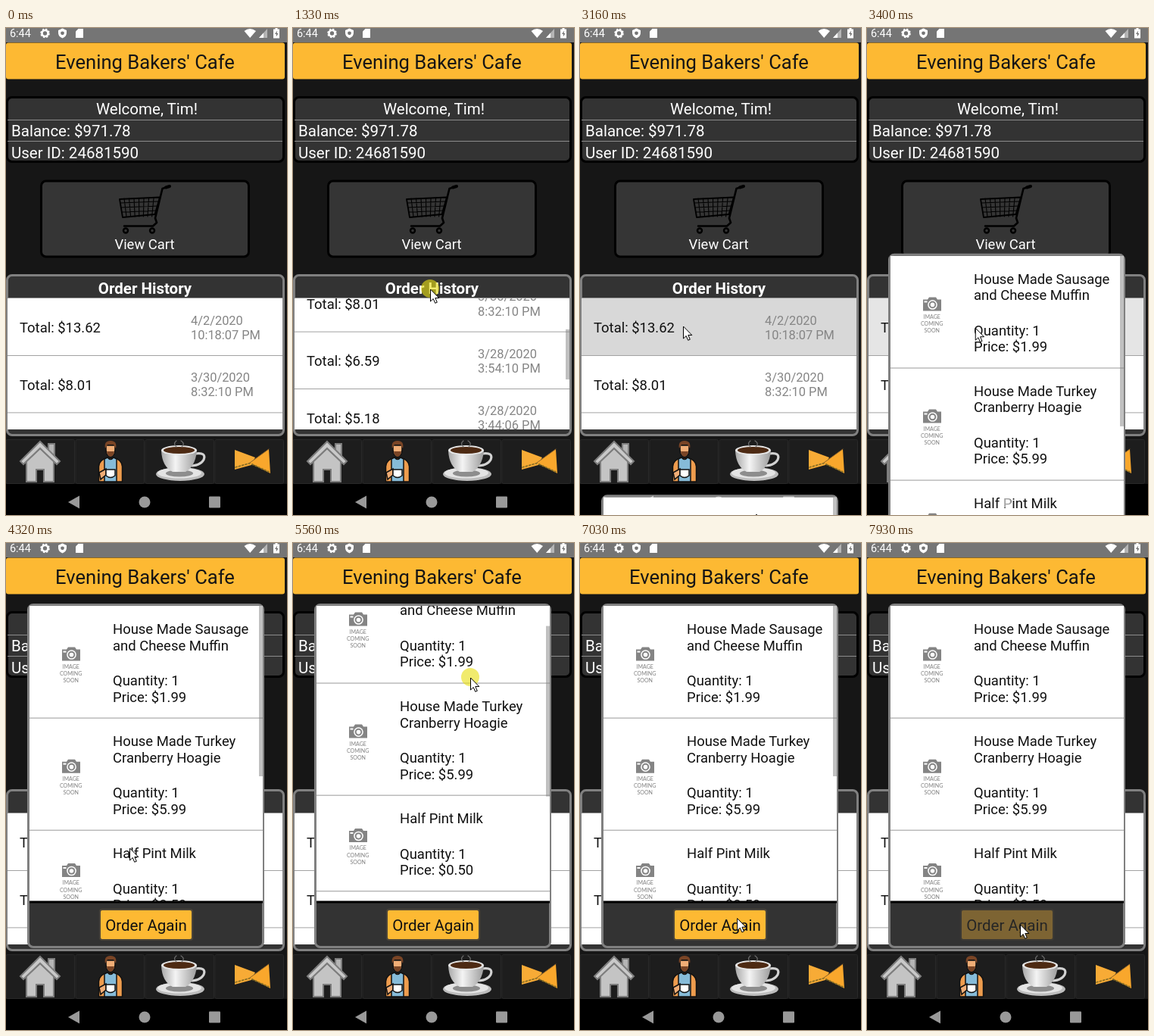
An HTML page that plays this animation: 371 by 643 pixels, repeating every 8000 ms.

```html
<!DOCTYPE html>
<html lang="en">
<head>
<meta charset="utf-8">
<title>Cafe order history</title>
<style>
html, body { margin: 0; width: 100%; height: 100%; overflow: hidden; background: #161616; }
svg { display: block; width: 371px; height: 643px; font-family: Roboto, sans-serif; }
.soon { font-family: Lato, sans-serif; }
</style>
</head>
<body>
<svg id="stage" viewBox="0 0 371 643" xmlns="http://www.w3.org/2000/svg"></svg>
<script>
const LOOP = 8000;
const LIST = { top: 357, view: 173, row: 75.4 };
const SHEET = { top: 83, view: 390, line: 21.5, rise: 563 };

const orders = [
  ['$13.62', '4/2/2020', '10:18:07 PM'],
  ['$8.01', '3/30/2020', '8:32:10 PM'],
  ['$6.59', '3/28/2020', '3:54:10 PM'],
  ['$5.18', '3/28/2020', '3:44:06 PM'],
  ['$7.25', '3/27/2020', '9:15:42 PM'],
  ['$4.49', '3/26/2020', '6:21:30 PM']
];
const items = [
  ['$1.99', 'House Made Sausage', 'and Cheese Muffin'],
  ['$5.99', 'House Made Turkey', 'Cranberry Hoagie'],
  ['$0.50', 'Half Pint Milk'],
  ['$1.99', 'Bottled Soda'],
  ['$1.49', 'Bottled Water']
];
const itemHeight = ([, ...name]) => 105.1 + name.length * SHEET.line;
LIST.length = orders.length * LIST.row;
SHEET.length = items.reduce((sum, item) => sum + itemHeight(item), 0);
for (const box of [LIST, SHEET]) {
  box.max = box.length - box.view;
  box.thumb = box.view * box.view / box.length;
}

// Markup helpers
const mid = 'text-anchor="middle"';
const text = (x, y, s, size, fill = '#fff', more = '') =>
  `<text x="${x}" y="${y}" font-size="${size}" fill="${fill}" ${more}>${s}</text>`;
const rect = (x, y, w, h, fill, more = '') =>
  `<rect x="${x}" y="${y}" width="${w}" height="${h}" fill="${fill}" ${more}/>`;
const path = (d, fill, more = '') => `<path d="${d}" fill="${fill}" ${more}/>`;
const line = (d, color, width = 1, more = '') =>
  path(d, 'none', `stroke="${color}" stroke-width="${width}" stroke-linecap="round" stroke-linejoin="round" ${more}`);
const dot = (x, y, r, fill, more = '') => `<circle cx="${x}" cy="${y}" r="${r}" fill="${fill}" ${more}/>`;
const oval = (x, y, rx, ry, fill) => `<ellipse cx="${x}" cy="${y}" rx="${rx}" ry="${ry}" fill="${fill}"/>`;
const panel = (x, y, w, h, fill, edge) =>
  rect(x + 1.5, y + 1.5, w - 3, h - 3, fill, `rx="6.500" stroke="${edge}" stroke-width="3"`);
const repeat = (n, make) => Array.from({ length: n }, (_, i) => make(i)).join('');

function statusBar() {
  return rect(0, 0, 371, 19, '#757575') +
    text(5, 12, '6:44', 14.4) +
    dot(51.5, 7, 4, 'none', 'stroke="#fff" stroke-width="2.6"') +
    dot(51.5, 7, 5.5, 'none', 'stroke="#fff" stroke-width="1.6" stroke-dasharray="2.4 1.92"') +
    path('M74.500 0.500L80 3V7Q79.500 11.500 74.500 13.500Q69.500 11.500 69 7V3Z', '#fff') +
    dot(74.5, 6.8, 2.4, '#757575') +
    path('M95.500 1H102V13H92V4.500Z', '#fff') +
    path('M314.500 4Q322 -2 330 4L322.200 13Z', '#fff') +
    path('M334 13L345 1V13Z', '#b4b4b4') + path('M334 13L340 6.500V13Z', '#fff') +
    path('M355.500 0H358.500V1.500H361V13.500H353V1.500H355.500Z', '#fff') +
    path('M358 3.500L355 8H356.800V11.500L359.500 7H357.600Z', '#757575');
}

function cart() {
  const bars = repeat(7, i => `M${156 + i * 6.5} 225L${159 + i * 5.6} 249`);
  const rows = repeat(3, i => `M${151 + i} ${231 + i * 6}L${202 - i * 1.5} ${229 + i * 6}`);
  return line('M216 209L206.500 212L197 251L199 257L194 261.500H156', '#000', 2.6) +
    line('M150 226L203 223.500L196.500 246L154 250Z', '#000', 1.8) +
    line(bars + rows, '#000', 1.1) +
    line('M211 210.500L216 209', '#000', 4) +
    [158, 193].map(x => dot(x, 267.5, 3, '#353535', 'stroke="#000" stroke-width="2.4"')).join('');
}

function home() {
  const edge = 'stroke="#7d7d7d" stroke-width="2"';
  return path('M56 549H64V566L56 558Z', '#b5b5b5', edge) +
    path('M27 572V599H40V583H50V599H63V572L45 555Z', '#c4c4c4', edge) +
    path('M45 546L71 572L67 576L45 555L23 576L19 572Z', '#c9c9c9', edge);
}

function barista() {
  const edge = 'stroke="#111" stroke-width="1.500"';
  return path('M122.500 599V579Q123 570 133 568H143Q153 570 153.500 579V599Z', '#ee9c4e', edge) +
    path('M130 599V569L134 567Q138 572 142 567L146 569V599Z', '#86bbd8', edge) +
    path('M132 551H144V557Q143.500 566 138 566Q132.500 566 132 557Z', '#f0ad76', edge) +
    path('M131 555Q129 545 138 545Q147 545 145 555L142 550H134Z', '#7a4526') +
    path('M133 559H143Q142 566 138 566Q134 566 133 559Z', '#7a4526') +
    path('M123 587L132 582V590L125 596Z', '#f0ad76', edge) +
    path('M132 583H144V591Q138 596 132 591Z', '#fff', edge);
}

function cup() {
  return oval(230, 589, 32, 9, '#bdbdbd') + oval(229, 587.5, 29, 7, '#e4e4e4') + oval(229, 588, 18, 4.5, '#8d8d8d') +
    line('M250 562Q265 560 261 570Q257 577 246 578', '#d2d2d2', 3.2) +
    path('M205 558Q206 579 220 586H237Q250 579 252 558Z', 'url(#china)') +
    oval(228.5, 557.5, 23.5, 6.5, '#e6e6e6') + oval(228.5, 557.5, 20.5, 4.6, '#4d2a13') +
    line('M225 553Q220 549 225 545M232 553Q237 549 231 545', '#6f6f6f', 1.2);
}

function sandwich() {
  const filling = d => line(d, '#8a6f25', 1.8, 'stroke-dasharray="2 2.500"');
  return path('M302 557L329 567L324 577L302 583Z', '#f7ab36') + filling('M303 580L324 574') +
    path('M322 574L347 556L349 588Z', '#f9a72c') + filling('M325 576L347 586') +
    line('M322 574L347 556', '#93682b', 1);
}

function tabs() {
  const cells = repeat(4, i => rect(i * 92, 543.5, 90.5, 58, '#1d1d1d', 'stroke="#292929" rx="2"'));
  return cells + home() + barista() + cup() + sandwich();
}

function account() {
  return panel(0, 90, 368, 88, '#333', '#000') +
    rect(2, 121, 363, 1, '#8c8c8c') + rect(2, 149, 363, 1, '#8c8c8c') +
    text(186, 114, 'Welcome, Tim!', 20.5, '#fff', mid) +
    text(7, 143, 'Balance: $971.78', 20.5) +
    text(7, 172, 'User ID: 24681590', 20.5);
}

function orderRow([total, day, time], i) {
  const y = LIST.top + i * LIST.row;
  return text(18, y + 45.3, 'Total: ' + total, 18.45, '#111') +
    text(244, y + 34.5, day, 16.4, '#858585') +
    text(244, y + 54, time, 16.4, '#858585') +
    rect(2, y + LIST.row - .4, 363, 1, '#a2a2a2');
}

function history() {
  return panel(0, 325, 368, 214, '#333', '#808080') +
    text(183.5, 351, 'Order History', 20.5, '#fff', mid + ' font-weight="700"') +
    rect(2, 356, 363, 1, '#999') +
    `<g clip-path="url(#listClip)">` + rect(2, LIST.top, 363, LIST.view, '#fff') +
    `<g id="list">` + rect(2, LIST.top, 363, 75, '#d8d8d8', 'id="pressed"') + orders.map(orderRow).join('') + `</g>` +
    rect(360, LIST.top, 5, LIST.thumb, '#7c7c7c', 'id="listBar"') + `</g>`;
}

function camera(y) {
  return path(`M74 ${y - 6}H80L82 ${y - 9}H91L93 ${y - 6}H98V${y + 9}H74Z`, '#848484') +
    dot(86.5, y + 1, 6.3, '#fff') + dot(86.5, y + 1, 4.8, '#848484') + dot(86.5, y + 1, 2.8, '#fff') +
    rect(75.5, y - 4, 4, 2, '#fff') +
    ['IMAGE', 'COMING', 'SOON'].map((s, i) =>
      text(85.7, y + 19.4 + i * 9.2, s, 7.1, '#808080', mid + ' class="soon"')).join('');
}

function itemRows() {
  let y = SHEET.top;
  return items.map(item => {
    const [price, ...name] = item, height = itemHeight(item);
    const last = y + 15.5 + name.length * SHEET.line;
    const rows = name.map((s, i) => text(141, y + 37 + i * SHEET.line, s, 18.45, '#111')).join('') +
      text(141, last + 46.5, 'Quantity: 1', 18.45, '#111') +
      text(141, last + 68, 'Price: ' + price, 18.45, '#111') +
      camera(y + height / 2 - 10.5) +
      rect(31, y + height - .5, 308, 1, '#999');
    y += height;
    return rows;
  }).join('');
}

function sheet() {
  return `<g id="sheet">` + panel(28, 80, 313, 455, '#333', '#808080') +
    `<g clip-path="url(#sheetClip)">` + rect(31, SHEET.top, 308, SHEET.view, '#fff') +
    `<g id="items">` + itemRows() + `</g>` +
    rect(334, SHEET.top, 5, SHEET.thumb, '#7c7c7c', 'id="sheetBar"') + `</g>` +
    rect(31, 472.5, 308, 3, '#000') +
    `<g id="again">` + rect(124, 484, 122, 40, '#fdb933', 'rx="3" stroke="#4c4538" stroke-width="2"') +
    text(185, 512, 'Order Again', 20.5, '#111', mid) + `</g></g>`;
}

const navIcons = `<g fill="#fff" opacity=".6">` +
  path('M82 626L97 617.500V634.500Z', '#fff') + dot(183, 626, 7.5, '#fff') +
  rect(268, 618.5, 15, 15, '#fff', 'rx="1"') + `</g>`;

const pointer = `<g id="pointer">` + dot(0, 0, 12, '#e8de14', 'id="press"') +
  path('M.5 1V17L4.200 13.500L6.700 19.300L9.300 18.200L6.800 12.500H11.800Z', '#fff', 'stroke="#000"') + `</g>`;

document.getElementById('stage').innerHTML =
  `<defs><clipPath id="listClip">${rect(2, LIST.top, 363, LIST.view)}</clipPath>
  <clipPath id="sheetClip">${rect(31, SHEET.top, 308, SHEET.view)}</clipPath>
  <linearGradient id="china"><stop stop-color="#a8a8a8"/><stop offset=".4" stop-color="#f4f4f4"/>
  <stop offset="1" stop-color="#9c9c9c"/></linearGradient></defs>` +
  rect(0, 0, 371, 643, '#161616') + statusBar() +
  rect(0, 19.5, 368, 48, '#fdb933', 'rx="3"') +
  text(183.5, 53.5, "Evening Bakers' Cafe", 25.6, '#151515', mid) +
  account() +
  panel(45, 200.5, 277, 103, '#353535', '#000') + cart() + text(183, 292, 'View Cart', 18.45, '#fff', mid) +
  history() + tabs() + rect(0, 602, 371, 41, '#000') +
  sheet() + navIcons + pointer;

// Pointer stops: time, x, y
const route = [
  [70, 190, 612], [700, 181, 450], [1330, 181, 344],
  [1750, 182, 372], [2150, 184, 538],
  [2700, 136, 393], [3160, 136, 393], [3900, 163, 402], [4320, 163, 402], [4520, 205, 505],
  [5300, 234, 222], [5560, 234, 177],
  [6200, 238, 333], [6480, 239, 443], [7200, 202, 503]
];
// Each drag follows the finger, then flings on to one end
const drags = {
  list: [{ from: 700, to: 1330, end: LIST.max }, { from: 1750, to: 2150, end: 0 }],
  items: [{ from: 5300, to: 5560, end: SHEET.max }, { from: 6200, to: 6480, end: 0 }]
};
const taps = [{ from: 2850, to: 2970 }, { from: 7520, to: 7620 }];
const touches = [...drags.list, ...drags.items, ...taps];
const FLING = 450;

const ramp = (t, from, to) => Math.min(1, Math.max(0, (t - from) / (to - from)));
const smooth = (t, from, to) => { const p = ramp(t, from, to); return p * p * (3 - 2 * p); };
const mix = (a, b, p) => a + (b - a) * p;

function pointerAt(t) {
  const i = Math.max(1, route.findIndex(stop => stop[0] > t));
  const last = t >= route[route.length - 1][0];
  const a = route[last ? route.length - 2 : i - 1], b = route[last ? route.length - 1 : i];
  const p = smooth(t, a[0], b[0]);
  return { x: mix(a[1], b[1], p), y: mix(a[2], b[2], p) };
}

function scrollAt(list, max, t) {
  let pos = 0;
  for (const { from, to, end } of list) {
    if (t < from) break;
    const pulled = pos + pointerAt(from).y - pointerAt(Math.min(t, to)).y;
    const fling = 1 - (1 - ramp(t, to, to + FLING)) ** 2;
    pos = mix(Math.min(max, Math.max(0, pulled)), end, fling);
  }
  return pos;
}

const part = {};
document.querySelectorAll('g[id], rect[id], circle[id]').forEach(el => part[el.id] = el);
const place = (id, x, y) => part[id].setAttribute('transform', `translate(${x} ${y})`);
const fade = (id, v) => part[id].setAttribute('opacity', v);
// Scrollbars stay up from one time to another, then fade out
const barAt = (t, from, to) => t < from ? 0 : .48 * (1 - ramp(t, to, to + 300));

function draw(now) {
  const t = now % LOOP;
  const list = scrollAt(drags.list, LIST.max, t);
  const scroll = scrollAt(drags.items, SHEET.max, t);
  const rise = SHEET.rise * (1 - smooth(t, 3090, 3630));
  const { x, y } = pointerAt(t);

  place('list', 0, -list);
  place('listBar', 0, list * LIST.view / LIST.length);
  fade('listBar', barAt(t, 700, 2640));
  fade('pressed', ramp(t, 3050, 3090) - ramp(t, 3300, 3600));

  place('sheet', 0, rise);
  fade('sheet', t < 3090 ? 0 : 1);
  place('items', 0, -scroll);
  place('sheetBar', 0, scroll * SHEET.view / SHEET.length);
  fade('sheetBar', t < 5300 ? barAt(t, 3090, 4400) : barAt(t, 5300, 7350));
  fade('again', 1 - .8 * (smooth(t, 7600, 7720) - smooth(t, 7860, 8100)));

  place('pointer', x, y);
  fade('pointer', t < 70 ? 0 : 1);
  fade('press', touches.some(({ from, to }) => t >= from && t < to + 80) ? .62 : 0);
}

const start = performance.now();
function tick() {
  draw(performance.now() - start);
  requestAnimationFrame(tick);
}
tick();
</script>
</body>
</html>
```
